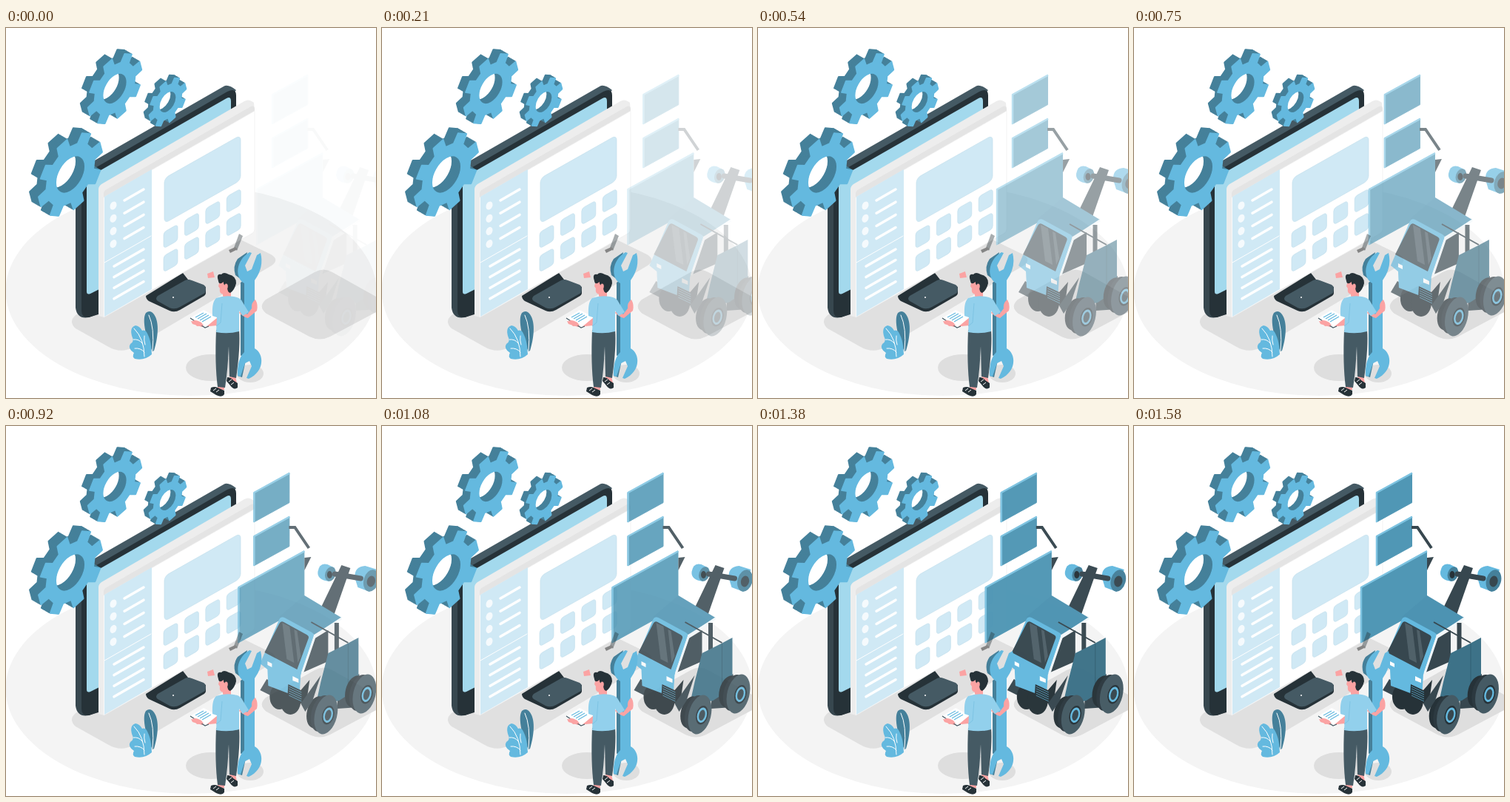
These frames come from a looping animation (500 px wide and 500 px high, 1.62 s). An HTML page:

```html
<!DOCTYPE html>
<html lang="en">
<head>
<meta charset="utf-8">
<title>Workshop</title>
<style>
  html, body { margin: 0; width: 100%; height: 100%; overflow: hidden; background: #fff; }
  svg { display: block; width: 100%; height: 100%; }
  .ink { fill: #263238; }
  .dark { fill: #37474f; }
  .slate { fill: #455a64; }
  .sky { fill: #64b9df; }
  .deep { fill: #45809a; }
  .pale { fill: #d0e9f5; }
  .shade { fill: #dedede; }
  .skin { fill: #fba3a3; }
  .line { fill: none; stroke: #fff; stroke-linecap: round; }
</style>
</head>
<body>
<svg viewBox="0 0 500 500">
  <ellipse cx="250" cy="355" rx="250.500" ry="142" fill="#f4f4f4"/>
  <g class="shade">
    <path d="M94 388 L285 284 Q300 277 315 285 L358 306 Q370 313 359 321 L173 431 Q155 441 137 430 L94 406 Q84 397 94 388Z" fill="#e0e0e0"/>
    <path d="M351 367 L417 330 Q429 323 441 330 L502 364 Q514 374 502 383 L438 417 Q424 424 410 417 L352 386 Q340 377 351 367Z"/>
    <ellipse cx="277" cy="459" rx="34" ry="18"/>
    <ellipse cx="330" cy="467" rx="18" ry="12"/>
  </g>

  <!-- monitor -->
  <path class="dark" d="M94 378 V205 L118 182 L128 385 L112 391 Q96 394 94 378Z"/>
  <path class="slate" d="M94 205 Q100 192 118 180 L294 79 Q300 75 311 84 L300 96 L104 212Z"/>
  <path class="ink" d="M102 382 V212 Q102 200 112 194 L299 86 Q311 80 311 91 V112 L128 215 V386 L112 391 Q102 392 102 382Z"/>
  <path d="M109 356 V211 Q109 203 116 199 L298 95 Q304 92 304 99 V115 L128 220 V352 L114 359 Q109 361 109 356Z" fill="#a3d9ed"/>

  <!-- stand -->
  <path class="ink" d="M189 362 L239 331 L246 340 L270 350 V358 Q270 361 266 363 L235 381 Q228 385 221 382 L193 369 Q189 366 189 362Z"/>
  <path class="slate" d="M205 362 L242 341 Q246 339 251 341 L267 347 Q272 350 269 358 L235 377 Q228 381 221 378 L205 369 Q201 366 205 362Z"/>
  <circle cx="226" cy="364" r="1" fill="#fff"/>

  <!-- window -->
  <path d="M125 389 V218 Q125 214 129 211 L322 99 Q328 95 335 101 L336 113 L133 231 V391Z" fill="#ededed"/>
  <path d="M132 224 Q132 220 136 218 L331 106 Q336 104 336 110 V272 Q336 276 332 278 L132 391Z" fill="#e4e4e4"/>
  <path d="M132 229 L336 112 V272 Q336 276 332 278 L132 391Z" fill="#fff" stroke="#eee" stroke-width=".7"/>
  <path class="pale" d="M133 228 L197 191 V353 L133 390Z"/>
  <g id="page"></g>

  <g id="gears"></g>

  <!-- plant -->
  <path class="deep" d="M198 437 C190 422 183 394 189 385 Q195 380 200 387 C208 398 205 420 200 436Z"/>
  <path class="sky" d="M197 441 Q187 450 174 447 Q170 444 173 439 Q164 433 168 427 Q174 424 170 416 Q167 404 175 402 Q181 403 184 409 Q189 407 192 415 Q195 421 196 430Z"/>
  <path class="line" d="M193 388 Q201 405 198 436 M173 406 Q187 420 187 444 M172 421 Q180 420 184 426 M174 433 Q182 432 187 438 M187 416 Q186 422 188 428" stroke-width="1"/>

  <g id="slide">
    <g id="panels"></g>
    <path d="M375 137 L383 137 L402 165" fill="none" stroke="#37474f" stroke-width="4"/>
    <path class="dark" d="M396 178 L405 177 L396 195Z"/>
    <!-- lifting arm -->
    <path class="dark" d="M446 188 L458 192 L436 255 L416 250Z"/>
    <path class="sky" d="M414 197 Q416 184 427 187 L437 192 L429 210 Q413 208 414 197Z"/>
    <ellipse class="deep" cx="431" cy="200" rx="7" ry="10" transform="rotate(18 431 200)"/>
    <ellipse class="ink" cx="430" cy="201" rx="3.500" ry="5"/>
    <path class="sky" d="M464 205 Q463 190 478 189 L494 194 L484 224 L468 218Z"/>
    <path d="M437 200 L472 206" stroke="#37474f" stroke-width="7" stroke-linecap="round"/>
    <ellipse class="deep" cx="486" cy="209" rx="10" ry="15" transform="rotate(15 486 209)"/>
    <ellipse class="dark" cx="486" cy="210" rx="5.500" ry="7.500" transform="rotate(15 486 210)"/>
    <!-- far wheels -->
    <path class="dark" d="M336 357 L345 342 L360 351 L350 364Z"/>
    <ellipse class="ink" cx="362" cy="366" rx="13" ry="17"/>
    <ellipse class="ink" cx="377" cy="371" rx="14" ry="19"/>
    <!-- cab -->
    <path d="M362 258 L396 229 L446 259 L409 282Z" fill="#4d93b2"/>
    <path class="dark" d="M394 333 L410 287 L428 276 V318Z"/>
    <path class="sky" d="M342 308 L362 261 Q364 257 369 259 L406 279 Q410 281 408 286 L391 336Z"/>
    <path class="dark" d="M342 306 L362 267 Q364 263 368 265 L399 282 Q403 284 401 288 L386 329Z"/>
    <path d="M366 266 L376 271 L382 320 L372 315Z M382 275 L386 277 L391 311 L387 320Z" fill="#61747c" opacity=".6"/>
    <path class="sky" d="M342 307 L391 335 L389 367 L347 351 L346 329 L336 321Z"/>
    <path d="M346 318 l6 3 v5 l-6 -3Z M380 338 l8 4 v5 l-8 -3Z" fill="#fff"/>
    <path d="M446 260 L410 284 L393 334" fill="none" stroke="#f1f8fb" stroke-width="3"/>
    <!-- rear body -->
    <path d="M439.500 266 V325" stroke="#37474f" stroke-width="6"/>
    <path class="dark" d="M442 350 L470 335 V380 L440 382Z"/>
    <path d="M428 307 L454 294 L469 286 V354 L443 371 L411 378 L418 346Z" fill="#3d7288"/>
    <path d="M455 294 V362" stroke="#335f72"/>
    <path d="M405 265 L455 293" stroke="#37474f" stroke-width="2"/>
    <g id="wheels"></g>
    <!-- bucket -->
    <path class="ink" d="M374 349 L391 357 L403 343 L398 378 L373 366Z"/>
    <path id="grill" fill="none" stroke="#64b9df" stroke-width=".7"/>
    <path class="dark" d="M391 375 L418 337 L407 371 L397 386Z"/>
  </g>

  <path d="M315 278 L320 281 L312 301 L308 297Z" fill="#263238" opacity=".4"/>
  <path d="M301 300 L310 296 L313 299 L303 304Z" fill="#858585"/>

  <!-- wrench -->
  <path class="deep" d="M317 344 L323 340 V440 L317 443Z M310 334 Q306 322 313 312 L326 303 L318 340Z M313 470 Q314 448 323 434 L326 440 L319 472Z"/>
  <path class="sky" d="M322 345 C309 338 310 314 329 303 L332 304 L323 321 L326 329 L332 326 L339 307 L344 304 Q349 323 336 341 V433 C349 440 350 464 328 474 L325 473 L332 457 L329 450 L323 453 L317 471 L313 470 Q312 448 322 438Z"/>

  <!-- person -->
  <path class="skin" d="M272 332 L280 329 L282 337 L273 338Z"/>
  <path class="skin" d="M286 478 h9 v11 h-9Z M302 470 h8 l2 10 h-8Z"/>
  <path class="ink" d="M277 486 Q282 484 286 486 L295 490 V495 Q292 500 284 496 L276 491Z M299 472 Q304 472 307 476 L313 480 V486 Q308 490 303 483 L298 477Z"/>
  <path d="M280 490 l4 -3 M284 492 l4 -3 M301 478 l4 -3 M304 482 l4 -3" stroke="#fff"/>
  <path class="slate" d="M284 408 H315 Q317 430 311 473 L302 471 L301 430 Q300 460 296 486 L286 485 Q282 455 284 408Z"/>
  <path class="skin" d="M317 381 L326 387 L332 379 Q331 371 337 367 Q341 374 339 382 L327 392 Q322 391 315 385Z"/>
  <path class="skin" d="M280 390 L286 392 L285 402 L265 404 L252 400 L250 396 L264 398 L278 397Z"/>
  <path d="M249 392 L267 381 L286 391 L269 405Z" fill="#fff"/>
  <path d="M249 392 L269 405 L274 403" fill="none" stroke="#455a64" stroke-width="1.300"/>
  <path d="M256 391 l11 -6 M259 393 l12 -7 M262 395 l12 -7 M265 397 l12 -7" stroke="#64b9df" stroke-width="1.200"/>
  <path class="skin" d="M252 396 Q256 393 264 398 L267 402 L258 403Z M292 355 H304 V367 H294Z"/>
  <path d="M284 365 Q295 361 308 363 Q317 364 320 371 L328 384 L320 389 L315 382 V410 Q300 414 284 411 L285 391 L279 389 Q278 370 284 365Z" fill="#92d0ec"/>
  <path d="M292 372 L290 398 L284 403" fill="none" stroke="#78bfe0" stroke-width=".8"/>
  <path class="skin" d="M289 341 L300 338 L303 355 Q299 361 291 359 Q288 357 289 352 L287 349Z"/>
  <path class="ink" d="M286 338 Q285 332 291 333 Q294 329 301 333 Q311 335 311 345 Q309 354 303 358 Q299 357 299 350 Q293 347 294 343 Q288 348 287 342Z"/>
  <ellipse class="skin" cx="297.500" cy="349" rx="2.300" ry="3.500"/>
</svg>
<script>
const $ = id => document.getElementById(id);
const LOOP = 1620;

const slantRect = (x, y, w, h, r) =>
  `<rect width="${w}" height="${h}" rx="${r}" fill="#d0e9f5" stroke="#c4dfec" stroke-width=".6"
    transform="matrix(1 -.565 0 1 ${x} ${y})"/>`;

function drawPage() {
  let out = slantRect(214, 203, 103, 61, 6);
  let bars = '';
  for (let i = 0; i < 8; i++) {
    const dx = i % 4 * 28.4;
    out += slantRect(213 + dx, 276 + (i > 3) * 32 - dx * .565, 19, 22, 4);
  }
  for (let i = 0; i < 4; i++) {
    const y = 240 + i * 17.2;
    out += `<ellipse cx="145" cy="${y}" rx="4.2" ry="5.8" transform="rotate(25 145 ${y})" fill="#f5fafd"/>`;
    bars += `M160 ${y - 7} l26 -15 M146 ${322 + i * 14.6} l40 -23 `;
  }
  return out + `<path class="line" d="M133 317 L196 281"/><path class="line" d="${bars}" stroke-width="3.5"/>`;
}

// Eight-toothed wheel seen in an isometric plane, extruded up and to the left.
function gear(cx, cy, R, hole, depth) {
  const point = (r, deg) => {
    const a = deg * Math.PI / 180;
    return [r * Math.cos(a), r * Math.sin(a)].map(n => n.toFixed(2)).join(' ');
  };
  const outline = [];
  for (let a = 30; a < 390; a += 45)
    outline.push(point(R * .74, a - 13), point(R * .98, a - 9), point(R * .98, a + 9), point(R * .74, a + 13));
  const d = `M${outline.join('L')}ZM${hole} 0A${hole} ${hole} 0 1 0 ${-hole} 0A${hole} ${hole} 0 1 0 ${hole} 0Z`;
  const layer = (k, fill) =>
    `<path d="${d}" fill="${fill}" stroke="${fill}" stroke-width="2" stroke-linejoin="round" fill-rule="evenodd"
      transform="matrix(.866 -.5 0 1 ${cx - k} ${cy - k * .58})"/>`;
  let out = '';
  for (let k = depth; k > 0; k--) out += layer(k, '#45809a');
  return out + layer(0, '#64b9df');
}

function panel(x, y, w, h) {
  const rise = w * .55;
  return `<path d="M${x} ${y} l${w} ${-rise} v${h} l${-w} ${rise}Z" fill="#5097b5" stroke="#5097b5" stroke-linejoin="round"/>
    <path d="M${x + .5} ${y + h} v${-h} l${w} ${-rise}" fill="none" stroke="#7dc3e1" stroke-width="2.5" stroke-linejoin="round"/>`;
}

function wheel(x, y) {
  const oval = (dx, rx, ry, fill) =>
    `<ellipse cx="${x + dx}" cy="${y}" rx="${rx}" ry="${ry}" fill="${fill}" transform="rotate(14 ${x} ${y})"/>`;
  return oval(-13, 13, 22, '#263238') + oval(-6, 14, 25, '#2c3940') + oval(0, 15, 27, '#455a64') +
    oval(3, 8, 13, '#263238') + oval(3, 6.5, 10.5, '#64b9df') + oval(3, 4, 7.5, '#37474f');
}

$('page').innerHTML = drawPage();
$('gears').innerHTML = gear(87, 198, 51, 23, 12) + gear(147, 82, 43, 19, 10) + gear(218.5, 100, 29.5, 13.5, 7);
$('panels').innerHTML = panel(327.5, 90, 48, 40) + panel(327.5, 149, 48, 40) + panel(306.5, 218, 89, 75);
$('wheels').innerHTML = wheel(477, 362) + wheel(425, 390);
$('grill').setAttribute('d', [0, 1, 2, 3, 4].map(i => `M375 ${352 + i * 3} l17 8`).join(''));

// Cubic ease-out with control points (0, 0) and (.58, 1).
function easeOut(x) {
  let lo = 0, hi = 1;
  for (let i = 0; i < 24; i++) {
    const s = (lo + hi) / 2;
    if (1.74 * (1 - s) * s * s + s ** 3 < x) lo = s; else hi = s;
  }
  return 3 * (1 - lo) * lo * lo + lo ** 3;
}

function draw() {
  const t = performance.now() % LOOP;
  const p = easeOut(Math.min(1, ((t < 80 ? 0 : t) + 25) / 1600));
  $('slide').setAttribute('transform', `translate(${33 * (1 - p)} 0)`);
  $('slide').setAttribute('opacity', p);
  requestAnimationFrame(draw);
}
draw();
</script>
</body>
</html>
```
